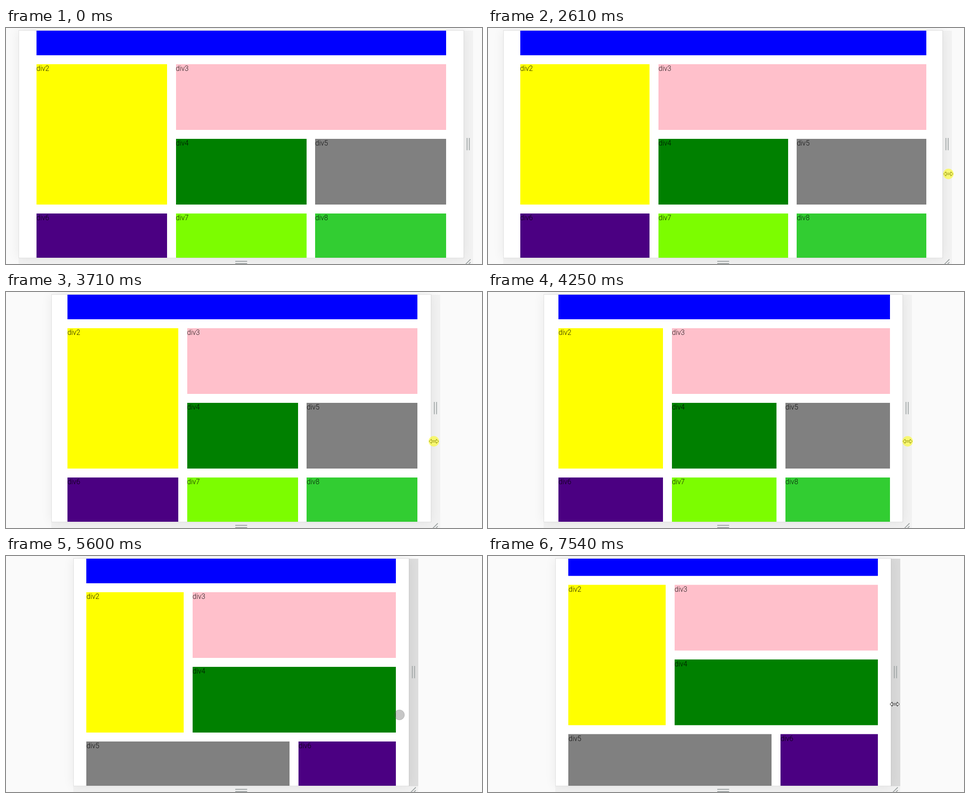
An HTML page for the animation above (8 s loop, 1061 px wide and 528 px high).

```html
<!DOCTYPE html>
<html lang="en">
<head>
<meta charset="utf-8">
<title>Responsive grid resize</title>
<style>
  html, body { margin: 0; width: 100%; height: 100%; overflow: hidden; background: #fafafa; }
  #stage { position: relative; width: 1061px; height: 528px; overflow: hidden; }
  #stage div, #stage svg { position: absolute; box-sizing: border-box; }
  #page {
    top: 5px; height: 510px; background: #fff; border: 1px solid #dedede;
    overflow: hidden; box-shadow: 0 0 24px rgba(0, 0, 0, .07);
  }
  #stage #grid {
    top: -92.3px; display: grid; gap: 19.65px;
    grid-template-columns: repeat(3, 1fr); grid-auto-rows: 147.4px;
  }
  #stage #grid div {
    position: static; min-width: 0; padding-top: 1px; color: rgba(0, 0, 0, .87);
    font: 300 15.7px/18.4px Roboto, sans-serif;
  }
  #grid :nth-child(1) { grid-column: span 3; }
  #grid :nth-child(2) { grid-row: span 2; }
  #grid :nth-child(3), #grid.narrow :nth-child(4), #grid.narrow :nth-child(5) { grid-column: span 2; }
  #right { top: 6px; width: 21px; height: 509px; }
  #bottom { top: 515px; height: 13px; }
  .bar { background: rgba(128, 128, 128, .55); }
  #vbar { width: 3px; height: 262px; }
  #hbar { left: 162px; top: 507px; width: 717px; height: 3px; }
  #overlay { left: 0; top: 0; }
</style>
</head>
<body>
<div id="stage">
  <div id="page"><div id="grid"></div></div>
  <div id="right"></div>
  <div id="bottom"></div>
  <div id="vbar" class="bar"></div>
  <div id="hbar" class="bar"></div>
  <svg id="overlay" width="1061" height="528">
    <g fill="none" stroke="#9da3a3" stroke-width="1.8">
      <path d="M511 522H537.5M511 527H537.5"/>
      <path id="grips" d="M7.7 246V273.5M12.7 246V273.5M4 529L15.5 517.5M10.5 529L15.5 524"/>
    </g>
    <g id="cursor">
      <path id="arrows" d="M-10.5 0L-5.5-4.8V-1.4H5.5V-4.8L10.5 0L5.5 4.8V1.4H-5.5V4.8Z"
            fill="#fff" stroke="#000"/>
      <circle id="touch" r="11.3" fill="rgba(50,50,50,.28)" stroke="rgba(120,120,120,.35)"/>
      <circle id="press" r="11.7" fill="rgba(255,255,0,.52)"/>
    </g>
  </svg>
</div>
<script>
  const LOOP = 8000, TICK = 68.65, DRAG = 2540, DROP = 5080, NARROW = 786;
  const CENTER = 524.1, LAG = 25;
  const colors = ['blue', 'yellow', 'pink', 'green', 'gray', 'indigo', '#7cfd00', 'limegreen', 'orange'];

  // Legs are [start, end, ...values reached].
  const edge = [
    [DRAG, 3020, 71], [3020, 3710, 101.2], [3710, 4730, 143.2], [4730, DROP, 149.5]
  ];
  const pointer = [
    [860, 1140, 1041, 281], [1340, 1410, 1032.5, 326],
    [DRAG, 3020, 988.5, 329], [3020, 3710, 953.5, 334], [3710, DROP, 908, 334],
    [5530, 5940, 728.5, 458], [6250, 6540, 728.5, 441.5], [7000, 7540, 906.5, 331.5]
  ];

  const el = id => document.getElementById(id);
  const within = (t, a, b) => t >= a && t < b;
  const ramp = (t, a, b) => Math.min(1, Math.max(0, (t - a) / (b - a)));
  const bump = (t, a, b) => Math.sin(Math.PI * ramp(t, a, b));
  const show = (id, on) => { el(id).style.visibility = on ? 'visible' : 'hidden'; };

  function travel(from, legs, t) {
    return legs.reduce((pos, [a, b, ...to]) =>
      pos.map((v, i) => v + (to[i] - v) * ramp(t, a, b)), from);
  }

  const edgeAt = t => travel([28], edge, t)[0];

  function place(id, left, width) {
    el(id).style.left = left + 'px';
    el(id).style.width = width + 'px';
  }

  function shade(id, hover) {
    el(id).style.background = `rgba(0,0,0,${0.03 + 0.1 * hover})`;
  }

  // The drag is redrawn in even ticks rather than continuously.
  function ticked(t) {
    if (!within(t, DRAG, DROP)) return t;
    return Math.min(DROP, DRAG + Math.floor((t - DRAG + 12) / TICK) * TICK);
  }

  function drawPage(t, scroll) {
    const left = Math.round(edgeAt(t));
    const right = Math.round(2 * CENTER - 0.6 - edgeAt(t));

    // The content trails the frame a little while it is dragged.
    const width = 0.92 * 2 * (CENTER - edgeAt(t - LAG));
    const middle = CENTER + 3 * bump(t, DRAG, DROP);

    place('page', left, right - left + 1);
    place('grid', middle - width / 2 - left - 1, width);
    el('grid').style.transform = `translateY(${-scroll}px)`;
    el('grid').classList.toggle('narrow', right - left < NARROW);

    place('bottom', left, right + 21 - left);
    el('right').style.left = right + 'px';
    el('grips').setAttribute('transform', `translate(${right} 0)`);
    el('vbar').style.left = right - 7 + 'px';
    el('vbar').style.top = 92.5 + scroll * 0.52 + 'px';
  }

  function draw(t) {
    const time = ticked(t);
    drawPage(time, 16.5 * ramp(t, 6250, 6540));

    shade('right', ramp(t, 930, 1140) - ramp(t, DRAG, 2610) + ramp(t, 5000, DROP)
      - ramp(t, 5560, 5800) + ramp(t, 7350, 7540));
    shade('bottom', 0.4 * bump(t, 260, 590));
    show('vbar', within(t, 6270, 6800));
    show('hbar', within(t, 6270, 6540));

    const [x, y] = travel([1020, 512], pointer, time);
    const touching = within(t, 860, 1080) || within(t, 5590, 7420);
    el('cursor').setAttribute('transform', `translate(${x} ${y})`);
    show('touch', touching);
    show('arrows', t >= 860 && !touching);
    show('press', within(t, 2340, DROP) || within(t, 6270, 6800));
  }

  colors.forEach((color, i) => {
    const tile = document.createElement('div');
    tile.textContent = 'div' + (i + 1);
    tile.style.background = color;
    el('grid').append(tile);
  });

  const start = performance.now();
  function frame() {
    draw((performance.now() - start) % LOOP);
    requestAnimationFrame(frame);
  }
  frame();
</script>
</body>
</html>
```
